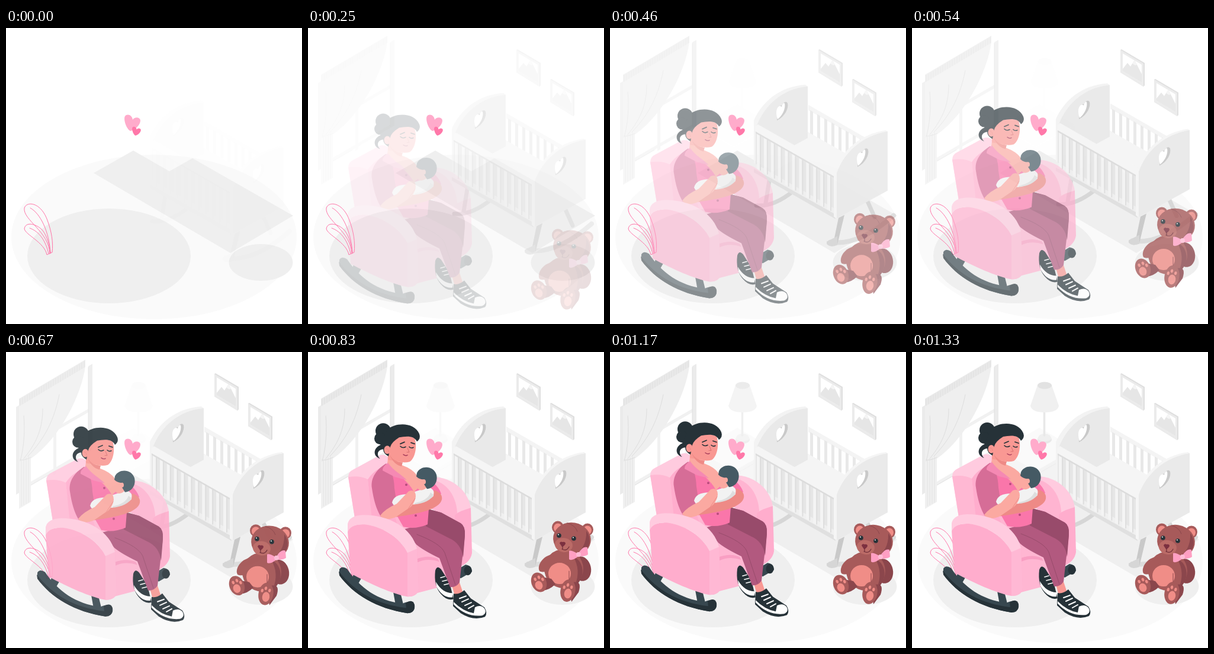
These frames come from a looping animation (500 px wide and 500 px high, 1.62 s). An HTML page:

```html
<!DOCTYPE html>
<html lang="en">
<head>
<meta charset="utf-8">
<title>Nursery</title>
<style>
html, body { margin: 0; height: 100%; overflow: hidden; background: #fff; }
svg { display: block; width: 100vw; height: 100vh; }
.line { fill: none; stroke-linecap: round; stroke-linejoin: round; }
</style>
</head>
<body>
<svg id="stage" viewBox="0 0 500 500"></svg>
<script>
const path = (fill, d) => `<path fill="${fill}" d="${d}"/>`;
const line = (color, width, d) => `<path class="line" stroke="${color}" stroke-width="${width}" d="${d}"/>`;
const oval = (fill, x, y, rx, ry = rx, turn = 0) =>
  `<ellipse fill="${fill}" cx="${x}" cy="${y}" rx="${rx}" ry="${ry}" transform="rotate(${turn} ${x} ${y})"/>`;
const group = (id, ...parts) => `<g id="${id}">${parts.join('')}</g>`;
const repeat = (count, make) => Array.from({ length: count }, (_, i) => make(i)).join('');

const dark = '#263238', slate = '#37474f', skin = '#f99893', skinLight = '#fba9a1', skinShade = '#ee8a86';
const pink = '#ffadcd', pale = '#ffcbdf', rose = '#fa76aa', roseShade = '#d66d97';
const trousers = '#b2597f', trouserShade = '#984b6b';
const fur = '#a75a5a', furShade = '#8b464c', pad = '#f08d87';

const floor = () => [
  oval('#fafafa', 250, 353, 241, 139),
  path('#efefef', 'M148 245L215 207L276 242L315 220L485 317L379 380Z'),
  oval('#efefef', 174, 385, 138, 80),
  oval('#efefef', 430.5, 396, 54, 31)
];

const plant = () => line('#ff74a8', 1,
  `M74 381C73 344 28 324 31 304C35 292 59 294 70 325C77 344 80 362 78 379L69 383
   C65 362 32 349 31 339C33 326 52 331 62 342C70 353 74 368 75 380
   M41 304C58 313 73 344 75 380M40 338C57 344 67 360 72 381`);

const curtain = () => [
  path('#ebebeb', 'M17 93L22 90V238L17 241ZM139 24L146 20V165L139 169Z'),
  path('#f1f1f1', 'M42 219L139 163V169L42 225ZM80 116L85 113V205L80 208ZM80 130L139 96V102L80 136Z'),
  line('#e0e0e0', 1, 'M139 26V166M42 225L75 206'),
  path('#f0f0f0', 'M22 180L42 170V253L22 265Z'),
  path('#efefef', 'M22 91L134 24C128 72 91 146 42 180L22 186Z'),
  path('#e9e9e9', 'M22 79L134 13V25L22 92Z'),
  repeat(28, i => line('#dedede', .7, `M${24 + i * 4} ${80 - i * 2.37}v10`)),
  line('#dddddd', 1, 'M24 184C31 160 32 130 30 108M30 180C54 151 62 126 62 96M37 176C67 145 82 112 90 72M24 182C28 184 38 180 42 178'),
  repeat(4, i => line('#e0e0e0', .8, `M${26 + i * 4} ${183 - i * 2}v77`))
];

const picture = (x, y) => `<g transform="translate(${x} ${y})">` + [
  path('#dedede', 'M0 0L2-1L41 22V60L39 62L0 38Z'),
  path('#ebebeb', 'M0 0L39 23V62L0 38Z'),
  path('#fff', 'M4 6L36 25V55L4 36Z'),
  path('#e6e6e6', 'M4 32L12 22L17 28L24 17L36 41V55L4 36Z'),
  path('#f5f5f5', 'M20 23L24 17L28 25L25 26Z')
].join('') + '</g>';

const lamp = () => [
  path('#fafafa', 'M215 128L276 163L209 201L148 166Z'),
  path('#f6f6f6', 'M148 166L209 201V280L148 245Z'),
  path('#f3f3f3', 'M276 163L209 201V280L276 242Z'),
  line('#ececec', 1, 'M214 205L272 172V200L214 233Z'),
  oval('#e8e8e8', 224, 148, 12, 7),
  path('#efefef', 'M212 147Q214 138 224 138Q234 138 236 147Q224 155 212 147Z'),
  line('#e8e8e8', 3.5, 'M223.5 100V141'),
  path('#f0f0f0', 'M212 56L200 91Q203 102 224 102Q246 102 248 91L236 56Z'),
  oval('#e2e2e2', 224, 56.5, 12, 6)
];

const heartHole = (x, y) => `<g transform="translate(${x} ${y})">` +
  path('#c9c9c9', 'M0 31C14 24 20 10 18 2C15-3 11 1 9 6C7 4 2 8 0 15Z') +
  path('#fff', 'M1 29C10 22 15 10 13 2C11 1 9 4 8 8C5 4-1 8-1 18C-1 22 0 26 1 29Z') + '</g>';

const crib = () => [
  line('#d6d6d6', 7, 'M269 254L263 292M247 296Q275 299 308 273M434 287L447 316'),
  line('#dcdcdc', 8, 'M372 358Q420 365 479 313'),
  path('#e4e4e4', 'M243 222L334 172L469 250V268L382 314L243 238Z'),
  path('#f4f4f4', 'M335 126L441 187V195L335 135Z'),
  repeat(8, i => path('#e8e8e8', `M${338 + i * 12} ${135 + i * 6.9}l5 3v52l-5-3Z`)),
  path('#f5f5f5', 'M246 215L317 173Q325 167 336 173L400 209L379 260L340 270Z'),
  path('#f3f3f3', 'M243 159V152C257 121 286 95 330 92L334 95V182L248 229L243 226Z'),
  path('#e9e9e9', 'M248 161C262 126 291 99 334 95V182L248 229Z'),
  heartHole(282, 121.5),
  path('#e6e6e6', 'M246 171L379 247V305L246 230Z'),
  path('#e0e0e0', 'M243 226L381 303V319L243 240Z'),
  path('#f0f0f0', 'M243 224L379 301V310L243 234Z'),
  repeat(11, i => path('#f4f4f4', `M${248 + i * 11.9} ${171 + i * 6.8}h5v66l-5-3Z`) +
    path('#dedede', `M${253 + i * 11.9} ${174 + i * 6.8}h2v63h-2Z`)),
  path('#dcdcdc', 'M246 171L379 247V250L246 174Z'),
  path('#f5f5f5', 'M246 162L250 159L381 234L379 247L246 171Z'),
  path('#f5f5f5', 'M378 239C392 202 424 175 466 169L469 171L382 318L378 315Z'),
  path('#eaeaea', 'M383 241C396 205 427 178 469 171V271L383 318Z'),
  heartHole(418, 200),
  path('#c9c9c9', 'M386 317L396 312L384 362L374 365L379 351Z'),
  path('#d6d6d6', 'M366 357L384 348V363Q372 368 366 361Z')
];

const foot = (x, y, rx, ry, turn) => [
  oval(fur, x, y, rx, ry, turn), oval(pad, x, y + 5, rx * .5, ry * .44, turn),
  ...[-.5, 0, .5].map(k => oval(pad, x + rx * k, y - ry * (.5 - Math.abs(k) * .4), 2.2, 3, turn))
].join('');

const bear = () => [
  oval(furShade, 462, 370, 16, 21, -12),
  oval(fur, 432, 370, 33, 33),
  path(furShade, 'M448 349C470 360 467 389 451 399C458 380 457 365 448 349Z'),
  path(fur, 'M414 346C397 347 386 365 391 374C400 379 413 371 417 360Z'),
  oval(pad, 425, 378, 19, 18),
  path(furShade, 'M385 404Q402 412 418 396L411 387L390 383Z'),
  foot(390, 393, 12.5, 17, -22),
  path(furShade, 'M441 395Q465 386 457 410L445 426Z'),
  foot(439, 407, 12.5, 19, 10),
  oval(fur, 422, 300, 10, 10.5), oval(pad, 422, 301, 7, 7.5),
  oval(fur, 472, 304, 10, 10.5), oval(pad, 472, 305, 7, 7.5),
  oval(fur, 446, 320, 32, 28, 10),
  path(furShade, 'M470 306C484 325 471 348 447 349C464 340 471 325 470 306Z'),
  line(furShade, 1, 'M438 293Q451 296 455 307M441 374V388'),
  oval('#bb6b67', 432, 330, 15, 12, 10),
  path('#7c3040', 'M425 327Q426 323 430 325Q435 324 435 328Q432 333 429 333Z'),
  line('#6d2d38', 1.2, 'M430 332V337M429 337Q437 341 441 333'),
  oval(dark, 424, 314, 3.8), oval(dark, 449, 319, 3.8), oval('#fff', 423, 312.5, 1), oval('#fff', 448, 317.5, 1),
  path('#ff9fc3', 'M456 345Q444 338 441 340V354Q445 358 457 349Q467 350 473 346L472 334Q464 331 456 345Z'),
  oval('#ffbdd6', 457, 346, 4)
];

const armchair = () => [
  path(slate, 'M244 371L266 358Q277 359 277 370L258 381Z'), oval(dark, 270, 368, 6.5, 8),
  path(pale, 'M68 210Q68 201 77 197L120 174Q132 169 139 182L152 220L158 300L80 285Z'),
  path('#ffb8d3', 'M68 210Q88 207 101 214L111 300L80 285Z'),
  path(pink, 'M101 214Q114 194 140 188L158 300H110Z'),
  path(pale, 'M200 211C237 205 270 230 275 262L265 283L230 273Z'),
  path('#ffb4d1', 'M200 214C229 213 250 237 252 270L248 284L205 262Z'),
  path(pink, 'M248 275Q251 269 275 262L277 338Q275 352 260 360L248 365Z'),
  path('#ffb6d2', 'M145 270L220 270L256 320V363L226 395L184 406Z'),
  path('#f99fc3', 'M184 348Q204 341 219 348L222 353Q202 346 185 354Z')
];

const leftArm = () => [
  path(slate, 'M77 374L90 381L81 397L71 391ZM144 404L157 409L162 429L149 432Z'),
  path(slate, 'M53 366Q57 359 66 365C88 398 118 418 159 424Q175 416 180 426Q182 438 168 440C116 432 76 408 53 376Z'),
  path(dark, 'M52 369C79 405 117 425 165 431L180 430Q179 440 168 440C116 432 76 408 53 376Z'),
  path(dark, 'M165 423Q177 415 180 426L178 435L166 432Z'),
  path(pink, 'M67 302Q72 289 96 290C131 295 157 315 168 338L184 330L187 398Q186 412 168 412C141 407 107 391 72 373Z'),
  path('#ffb8d4', 'M168 338L184 330L187 398Q186 412 168 412Z'),
  path(pale, 'M67 303V289Q70 275 93 274C139 274 176 297 184 331L168 338C157 315 131 295 96 290Q72 289 67 303Z')
];

const mother = () => [
  path(dark, 'M215 368Q218 358 225 366L239 388L246 416Q235 420 224 407Q212 393 215 368Z'),
  path('#fff', 'M216 387Q227 406 244 406V413Q228 415 217 395Z'),
  line('#fff', 1.6, 'M224 380l7-2M227 386l8-2M230 392l8-2'),
  path(skin, 'M243 393L256 388L263 409L249 414Z'),
  path(trousers, 'M163 298L202 287L203 264L225 270L258 288Q266 293 265 309L256 388Q250 397 240 396L222 347Q195 334 183 324Z'),
  path(trouserShade, 'M203 264L225 270L258 288Q266 293 265 309L262 346Q259 322 238 313L199 293Z'),
  line(trouserShade, 1, 'M184 307Q224 322 231 338L249 392'),
  path(dark, 'M246 407Q255 409 264 401L275 415L298 430Q304 440 299 446Q280 454 258 440L245 428Z'),
  path('#fff', 'M282 430Q292 425 298 432Q303 440 294 444Q267 447 246 425V421Q262 437 280 440Z'),
  line('#fff', 2, 'M256 415l11-4M260 421l11-5M265 427l11-5M271 432l9-5'),
  path(rose, 'M134 185C151 194 176 203 190 211C212 215 221 227 225 238L204 264L202 290Q181 299 161 294L145 266Z'),
  path(roseShade, 'M132 187C117 196 105 211 108 229C111 249 115 263 123 277L151 262L146 229Q145 201 132 187Z'),
  path(skinLight, 'M136 169L155 181L159 190Q176 196 184 207L190 225L179 235C168 214 147 204 134 188Z'),
  path('#f589b3', 'M135 186Q125 193 126 199L147 210L167 215C157 205 145 200 135 186Z'),
  oval('#b94c7d', 166, 223, 2), oval('#b94c7d', 172, 242, 2), oval('#b94c7d', 182, 275, 2),
  path('#f2f2f2', 'M142 253Q145 239 167 239L204 227Q216 232 212 243C202 258 180 257 163 258Q147 265 142 253Z'),
  path('#dedede', 'M180 254Q202 250 207 236L212 240Q205 257 180 256Z'),
  path(skinShade, 'M213 232Q228 237 226 248C222 264 189 272 150 277L163 256C187 258 202 253 212 242Z'),
  path(skinLight, 'M186 207L201 207L202 226Q194 235 187 231Q180 225 186 218Z'),
  path('#455a64', 'M184 203C190 190 212 190 217 206C220 219 212 229 201 230L196 222L197 214Q189 215 183 209Z'),
  oval(skinLight, 196, 218, 3, 4),
  path(skinLight, 'M122 275Q130 264 150 255L170 234Q182 229 182 243Q180 257 169 264L150 277Q129 286 122 275Z'),
  line(skinShade, 1, 'M181 246L169 264L150 277'),
  path(skin, 'M134 149Q142 137 160 138L180 144C185 158 181 178 172 184Q162 187 151 183L135 181Z'),
  path(skinShade, 'M138 173Q147 186 160 185L158 192Q145 189 138 173Z'),
  oval(dark, 127, 132, 13), oval(dark, 122, 145, 10),
  path(dark, `M134 130C146 118 179 116 188 137Q191 145 184 150C179 139 165 141 154 143Q141 151 139 159
    L136 175Q127 170 127 163C116 164 116 174 122 179C109 175 110 161 122 156Z`),
  oval(skin, 134, 164, 5.5, 7), line(skinShade, 1, 'M132 162Q136 162 136 167'),
  line(dark, 1.8, 'M156 154L163 151M174 152L180 154'),
  line(dark, 1.6, 'M156 158Q160 162 165 159M171 159Q174 162 178 160'),
  line('#d66f70', 1, 'M168 161L171 168L167 168'),
  line('#a63d5b', 1.5, 'M161 172Q165 175 168 173')
];

const heart = (fill, place) => `<path transform="${place}" fill="${fill}"
  d="M10 27C3 23-2 7 1 2C5-3 13 0 14 8C17 3 26 3 27 9C27 17 18 25 10 27Z"/>`;

stage.innerHTML = [
  ...floor(), plant(),
  group('window', ...curtain()),
  group('pictures', picture(352, 37), picture(409, 87)),
  group('lamp', ...lamp()),
  group('crib', ...crib()),
  group('bear', ...bear()),
  group('mother', ...armchair(), ...mother(), ...leftArm()),
  heart('#ffabcb', 'translate(200 147)'),
  heart('#ff78a9', 'translate(213 167) scale(.55)')
].join('');

const clamp = v => Math.min(1, Math.max(0, v));

const bezier = (x1, y1, x2, y2) => x => {
  const at = (a, b, s) => 3 * a * s * (1 - s) ** 2 + 3 * b * s * s * (1 - s) + s ** 3;
  let low = 0, high = 1;
  for (let i = 0; i < 24; i++) {
    const mid = (low + high) / 2;
    if (at(x1, x2, mid) < x) low = mid; else high = mid;
  }
  return at(y1, y2, low);
};
const ease = bezier(.25, .1, .25, 1);
const overshoot = bezier(.36, -.01, .5, 1.38);

const show = (id, opacity, dy = 0) => {
  const part = document.getElementById(id);
  part.setAttribute('opacity', clamp(opacity));
  part.setAttribute('transform', `translate(0 ${dy})`);
};

const LOOP = 1620, HOLD = 170, STEP = 1000 / 24;

function draw(now) {
  const time = now % LOOP;
  // The motion runs at 24 steps a second between two still holds.
  const n = time < HOLD ? 0 : Math.min(29, 1 + Math.floor((time - HOLD + 9) / STEP));
  const slide = (id, curve, start, length, rise, strength = 1) => {
    const e = curve(clamp((n - start) / length));
    show(id, n || id === 'crib' ? e * strength : 0, rise * (1 - e));
  };
  show('window', n / 16);
  show('pictures', n / 11);
  show('lamp', clamp((n - 6) / 23) ** 2);
  slide('crib', ease, -1, 15, 32);
  slide('bear', overshoot, -2, 23, 60);
  slide('mother', overshoot, -3.5, 32, 30, 1.15);
  requestAnimationFrame(() => draw(performance.now()));
}
draw(performance.now());
</script>
</body>
</html>
```
